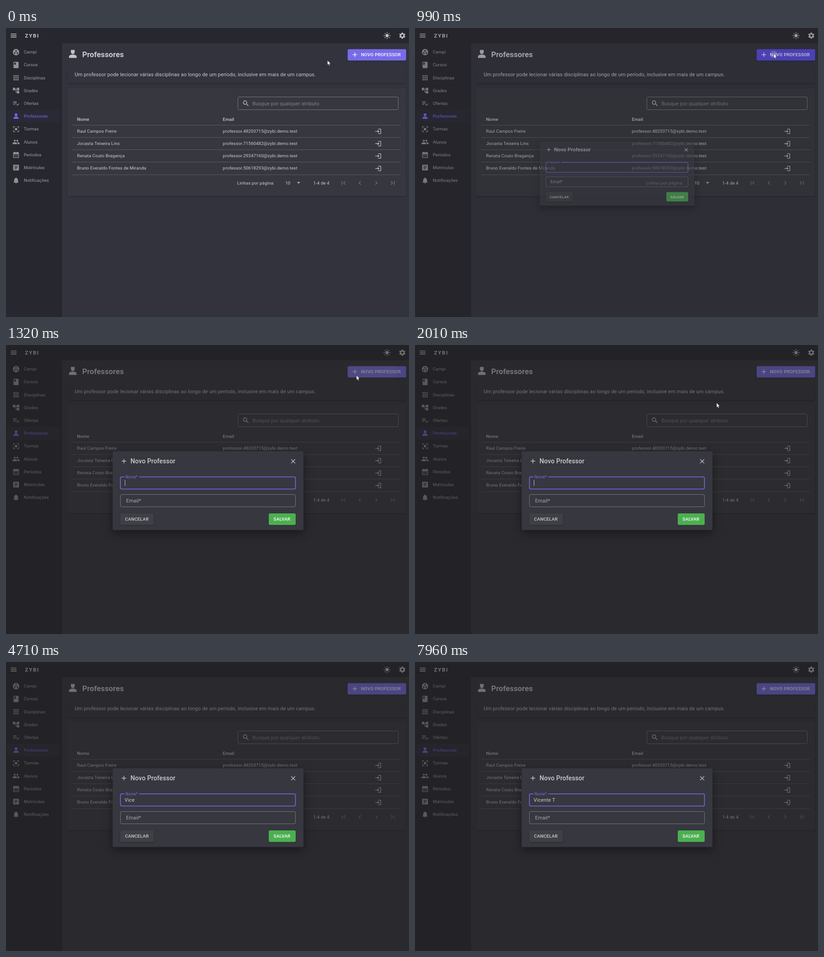
An HTML page for the animation above (8000 ms loop, 882 by 635 pixels).

```html
<!DOCTYPE html>
<html lang="pt-BR">
<head>
<meta charset="utf-8">
<title>Professores</title>
<style>
html, body { margin: 0; width: 100%; height: 100%; overflow: hidden; background: #32333d; }
svg { display: block; }
text { font: 400 9.74px Roboto, sans-serif; fill: rgba(255,255,255,.75); letter-spacing: .104px; }
.body { font-size: 11.13px; }
.nav { fill: rgba(255,255,255,.55); letter-spacing: 0; }
.on { fill: #776be7; }
.brand { font-weight: 700; font-size: 11.5px; letter-spacing: 1.7px; }
.h5 { font-weight: 700; font-size: 16.7px; letter-spacing: 0; }
.h6 { font-weight: 500; font-size: 13.92px; }
.th { font-weight: 500; }
.btn { font-weight: 500; letter-spacing: .278px; }
.white { fill: #fff; }
.hint { fill: rgba(255,255,255,.38); }
.float { font-size: 8.35px; letter-spacing: .08px; fill: #776be7; }
.icon { fill: rgba(255,255,255,.7); }
.icon.dim { fill: rgba(255,255,255,.5); }
.icon.off { fill: rgba(255,255,255,.3); }
.icon.on { fill: #776be7; }
.icon.white { fill: #fff; }
.box { fill: none; stroke: rgba(255,255,255,.32); }
.rule { stroke: rgba(255,255,255,.18); }
.shade { filter: drop-shadow(0 1px 1px rgba(0,0,0,.3)); }
.deep { filter: drop-shadow(0 7px 10px rgba(0,0,0,.38)); }

#cta, #veil, #dialog, #cursor, #ripple { animation: 8s linear infinite; }
#cta { animation-name: hover; }
#veil { animation-name: veil; }
#dialog { animation-name: open; transform-origin: 442.2px 320px; }
#cursor { animation-name: move; }
#ripple { animation-name: ripple; transform-origin: 785px 58px; }

@keyframes hover {
  0%, 3.5% { fill: #776be7; animation-timing-function: ease; }
  6.625%, 12.375% { fill: #594ae2; animation-timing-function: ease; }
  15.5%, 100% { fill: #776be7; }
}
@keyframes veil {
  0%, 11.875% { opacity: 0; animation-timing-function: ease; }
  13.75%, 100% { opacity: 1; }
}
@keyframes open {
  0%, 11.87% { opacity: 0; transform: scale(.5); animation-timing-function: cubic-bezier(.39,.575,.565,1); }
  13.125%, 100% { opacity: 1; transform: none; }
}
@keyframes ripple {
  0%, 11.9% { opacity: 0; transform: scale(0); }
  11.91% { opacity: .24; transform: scale(0); }
  15.9% { opacity: .06; transform: scale(1); }
  20%, 100% { opacity: 0; transform: scale(1); }
}
@keyframes move {
  0%, .4% { transform: translate(703.5px,71px); animation-timing-function: ease-in-out; }
  6.5%, 13.3% { transform: translate(785px,56px); }
  16.5% { transform: translate(767px,66.5px); }
  20.5% { transform: translate(742px,71px); }
  21.125% { transform: translate(712px,91px); }
  22.625%, 25.12% { transform: translate(660.5px,127px); opacity: 1; }
  25.125%, 31.87% { transform: translate(660px,127px); opacity: 1; }
  31.875%, 100% { transform: translate(660px,127px); opacity: 0; }
}
</style>
</head>
<body>
<svg id="stage" width="882" height="635" viewBox="0 0 882 635"></svg>
<script>
const PATHS = {
  menu: 'M3 18h18v-2H3zM3 13h18v-2H3zM3 6v2h18V6z',
  group: 'M12 2a10 10 0 1 0 0 20a10 10 0 1 0 0-20zM8 12.5a2.5 2.5 0 1 1 0 5a2.5 2.5 0 1 1 0-5zM12 5.5a2.5 2.5 0 1 1 0 5a2.5 2.5 0 1 1 0-5zM16 12.5a2.5 2.5 0 1 1 0 5a2.5 2.5 0 1 1 0-5z',
  book: 'M18 2H6a2 2 0 0 0-2 2v16a2 2 0 0 0 2 2h12a2 2 0 0 0 2-2V4a2 2 0 0 0-2-2zM6 4h5v8l-2.5-1.5L6 12z',
  apps: [4, 10, 16].map(y => [4, 10, 16].map(x => `M${x} ${y}h4v4h-4z`).join('')).join(''),
  tree: 'M22 11V3h-7v3H9V3H2v8h7V8h2v10h4v3h7v-8h-7v3h-2V8h2v3z',
  list: 'M3 10h11v2H3zM3 6h11v2H3zM3 14h7v2H3zM20.6 11.9l-4.25 4.25-2.1-2.1-1.4 1.4L16.35 19 22 13.35z',
  person: 'M18.4 14.56C16.7 13.7 14.5 13 12 13s-4.7.7-6.4 1.56A3 3 0 0 0 4 17.2V20h16v-2.8a3 3 0 0 0-1.6-2.64zM12 12a4 4 0 0 0 4-4V4.5a1.5 1.5 0 0 0-2.75-.83a1.5 1.5 0 0 0-2.5 0A1.5 1.5 0 0 0 8 4.5V8a4 4 0 0 0 4 4z',
  focus: 'M12 8a4 4 0 1 0 0 8a4 4 0 1 0 0-8zM5 15H3v4a2 2 0 0 0 2 2h4v-2H5zM5 5h4V3H5a2 2 0 0 0-2 2v4h2zM19 3h-4v2h4v4h2V5a2 2 0 0 0-2-2zM19 19h-4v2h4a2 2 0 0 0 2-2v-4h-2z',
  people: 'M16 11a3 3 0 1 0 0-6a3 3 0 1 0 0 6zM8 11a3 3 0 1 0 0-6a3 3 0 1 0 0 6zM8 13c-2.3 0-7 1.2-7 3.5V19h14v-2.5c0-2.3-4.7-3.5-7-3.5zM16 13l-1 .05c1.2.85 2 2 2 3.45V19h6v-2.5c0-2.3-4.7-3.5-7-3.5z',
  date: 'M19 4h-1V2h-2v2H8V2H6v2H5a2 2 0 0 0-2 2v14a2 2 0 0 0 2 2h14a2 2 0 0 0 2-2V6a2 2 0 0 0-2-2zM19 20H5V10h14z'
    + [12, 16].map(y => [7, 11, 15].map(x => `M${x} ${y}h2v2h-2z`).join('')).join(''),
  page: 'M19 3H5a2 2 0 0 0-2 2v14a2 2 0 0 0 2 2h14a2 2 0 0 0 2-2V5a2 2 0 0 0-2-2zM14 17H7v-2h7zM17 13H7v-2h10zM17 9H7V7h10z',
  bell: 'M12 22a2 2 0 0 0 2-2h-4a2 2 0 0 0 2 2zM18 16v-5c0-3.1-1.6-5.6-4.5-6.3V4a1.5 1.5 0 0 0-3 0v.7C7.6 5.4 6 7.9 6 11v5l-2 2v1h16v-1z',
  search: 'M15.5 14h-.8l-.3-.3A6.5 6.5 0 1 0 13.7 14.4l.3.3v.8l5 5 1.5-1.5zM9.5 14a4.5 4.5 0 1 1 0-9a4.5 4.5 0 1 1 0 9z',
  enter: 'M11 7L9.6 8.4l2.6 2.6H2v2h10.2l-2.6 2.6L11 17l5-5zM20 19h-8v2h8a2 2 0 0 0 2-2V5a2 2 0 0 0-2-2h-8v2h8z',
  drop: 'M7 10l5 5 5-5z',
  first: 'M18.4 16.6L13.8 12l4.6-4.6L17 6l-6 6 6 6zM6 6h2v12H6z',
  prev: 'M15.4 7.4L14 6l-6 6 6 6 1.4-1.4L10.8 12z',
  next: 'M8.6 7.4L10 6l6 6-6 6-1.4-1.4L13.2 12z',
  last: 'M5.6 7.4L10.2 12l-4.6 4.6L7 18l6-6-6-6zM16 6h2v12h-2z',
  plus: 'M19 13h-6v6h-2v-6H5v-2h6V5h2v6h6z',
  close: 'M19 6.4L17.6 5 12 10.6 6.4 5 5 6.4l5.6 5.6L5 17.6 6.4 19l5.6-5.6 5.6 5.6 1.4-1.4-5.6-5.6z'
};

// Baselines sit on whole pixels, as in page text.
const text = (x, y, s, cls = '', more = '') =>
  `<text x="${x}" y="${Math.round(y)}" class="${cls}" ${more}>${s}</text>`;
const rect = (x, y, w, h, r, more) => `<rect x="${x}" y="${y}" width="${w}" height="${h}" rx="${r}" ${more}/>`;
const rule = i => `<path class="rule" d="M145 ${Math.round(213 + i * 27.15) + .5}H864"/>`;
const place = (x, y, k, body) => `<g transform="translate(${x} ${y}) scale(${k}) translate(-12 -12)">${body}</g>`;
const icon = (name, x, y, cls = '', k = .696) =>
  place(x, y, k, `<path class="icon ${cls}" fill-rule="evenodd" d="${PATHS[name]}"/>`);
const spokes = (d, width, angles) => angles.map(a =>
  `<path d="${d}" stroke-width="${width}" transform="rotate(${a} 12 12)"/>`).join('');

const sun = place(834, 16.8, .696, `<g stroke="#c4c4c7" stroke-linecap="round"><circle cx="12" cy="12" r="5" fill="#c4c4c7" stroke="none"/>
  ${spokes('M12 2v2M12 20v2', 2, [0, 45, 90, 135])}</g>`);
const gear = place(867.3, 16.8, .696, `<g stroke="#bebec1" fill="none"><circle cx="12" cy="12" r="5.5" stroke-width="3.9"/>
  ${spokes('M12 2.2v4M12 17.8v4', 4.6, [0, 60, 120])}</g>`);

const nav = [['group', 'Campi'], ['book', 'Cursos'], ['apps', 'Disciplinas'], ['tree', 'Grades'], ['list', 'Ofertas'],
  ['person', 'Professores'], ['focus', 'Turmas'], ['people', 'Alunos'], ['date', 'Períodos'], ['page', 'Matrículas'],
  ['bell', 'Notificações']];
const rows = [['Raul Campos Freire', 48203715], ['Jocasta Teixeira Lins', 71560482],
  ['Renata Couto Bragança', 29347160], ['Bruno Everaldo Fontes de Miranda', 50618293]];

const sidebar = nav.map(([name, label], i) => {
  const y = 53 + i * 28.2, on = i === 5;
  return (on ? rect(3, 179.5, 114, 28, 3, 'fill="#776be7" fill-opacity=".045"') : '')
    + icon(name, 22, y, on ? 'on' : 'dim') + text(39, y + 3.2, label, on ? 'nav on' : 'nav');
}).join('');

const table = rows.map(([name, id], i) => {
  const y = 229.8 + i * 27.15;
  return text(155.6, y, name) + text(474.6, y, `professor.${id}@zybi.demo.test`)
    + icon('enter', 814.6, y - 2.7, '', .63) + rule(i + 1);
}).join('');

const cta = more => rect(747.6, 46.5, 128.2, 25, 3, more);

const page = `
  <rect width="882" height="635" fill="#32333d"/>
  <path d="M0 0H882V33.5H123V635H0z" fill="#27272f"/>
  ${icon('menu', 16.7, 16.8)}${text(41.5, 21, 'ZYBI', 'brand')}${sun}${gear}${sidebar}
  ${icon('person', 146.2, 57.3, '', 1.044)}${text(166.8, 64, 'Professores', 'h5')}
  ${cta('id="cta" class="shade"')}
  <g clip-path="url(#ctaClip)"><circle id="ripple" cx="785" cy="58" r="68" fill="#fff"/></g>
  ${icon('plus', 763.5, 58.6, 'white')}${text(776.9, 62, 'NOVO PROFESSOR', 'btn white')}
  ${rect(134, 86, 741.8, 35.5, 3, 'fill="#32333d" class="shade"')}
  ${text(150.3, 106, 'Um professor pode lecionar várias disciplinas ao longo de um período, inclusive em mais de um campus.', 'body')}
  ${rect(134, 132, 741.8, 237.5, 3, 'fill="#373740" class="shade"')}
  ${rect(507.5, 151.5, 351, 28, 3, 'class="box"')}
  ${icon('search', 525, 165.6)}${text(539.2, 169.6, 'Busque por qualquer atributo', 'body hint')}
  ${text(155.6, 204, 'Nome', 'th')}${text(474.6, 204, 'Email', 'th')}${rule(0)}${table}
  ${text(506, 343.6, 'Linhas por página:')}${text(611.3, 343.6, '10')}${icon('drop', 640.4, 340)}
  ${text(672.5, 343.6, '1-4 de 4')}
  ${['first', 'prev', 'next', 'last'].map((n, i) => icon(n, 738.6 + i * 35.9, 340.4, 'off')).join('')}`;

const dialog = `<g id="dialog">
  ${rect(233.5, 233.5, 417.5, 173, 3, 'fill="#373740" class="deep"')}
  ${icon('plus', 258.1, 255.2)}${text(272.6, 260.4, 'Novo Professor', 'h6')}${icon('close', 628.5, 255.5)}
  ${rect(250.5, 289.7, 383, 26.7, 3, 'fill="none" stroke="#776be7" stroke-width="1.5"')}
  <path d="M259.5 289.7H291.5" stroke="#373740" stroke-width="2.5"/>${text(261.8, 292.6, 'Nome*', 'float')}
  ${text(259.5, 307, '', 'body', 'id="typed"')}${rect(260, 296.5, .9, 13, 0, 'id="caret" fill="#d0d0d3"')}
  ${rect(250.5, 328.5, 383, 27, 3, 'class="box"')}${text(262.8, 346.4, 'Email*', 'body', 'style="fill:#a8a8ac"')}
  ${rect(250, 370, 73.5, 25.5, 3, 'fill="#3f4046" class="shade"')}${text(260.6, 386.2, 'CANCELAR', 'btn')}
  ${rect(575, 370, 59, 25.5, 3, 'fill="#4caf50" class="shade"')}${text(585.6, 386.2, 'SALVAR', 'btn white')}
</g>`;

document.getElementById('stage').innerHTML = `
  <clipPath id="ctaClip">${cta('')}</clipPath>
  ${page}<rect id="veil" width="882" height="635" fill="#212121" fill-opacity=".5"/>${dialog}
  <path id="cursor" d="M0 0V10.3L2.3 8.2 4 12 5.7 11.2 4 7.5H7.2z" fill="#fff" stroke="#15151a" stroke-width=".6"/>`;

// One keystroke time per letter; the caret restarts its blink on each.
const NAME = 'Vicente\u00a0T';
const KEYS = [2550, 2760, 3380, 4210, 5000, 5750, 5970, 6960, 7420];
const FOCUS = 1010, BLINK = 500;
const typed = document.getElementById('typed'), caret = document.getElementById('caret');
let start, shown = -1;

function tick(now) {
  start ??= now;
  const t = (now - start) % 8000;
  const n = KEYS.filter(k => k <= t).length;
  if (n !== shown) {
    typed.textContent = NAME.slice(0, n);
    caret.setAttribute('x', 260 + (n ? typed.getComputedTextLength() - .6 : 0));
    shown = n;
  }
  const since = t - (n ? KEYS[n - 1] : FOCUS);
  caret.style.opacity = Math.floor(since / BLINK) % 2 ? 0 : 1;
  requestAnimationFrame(tick);
}
requestAnimationFrame(tick);
</script>
</body>
</html>
```
